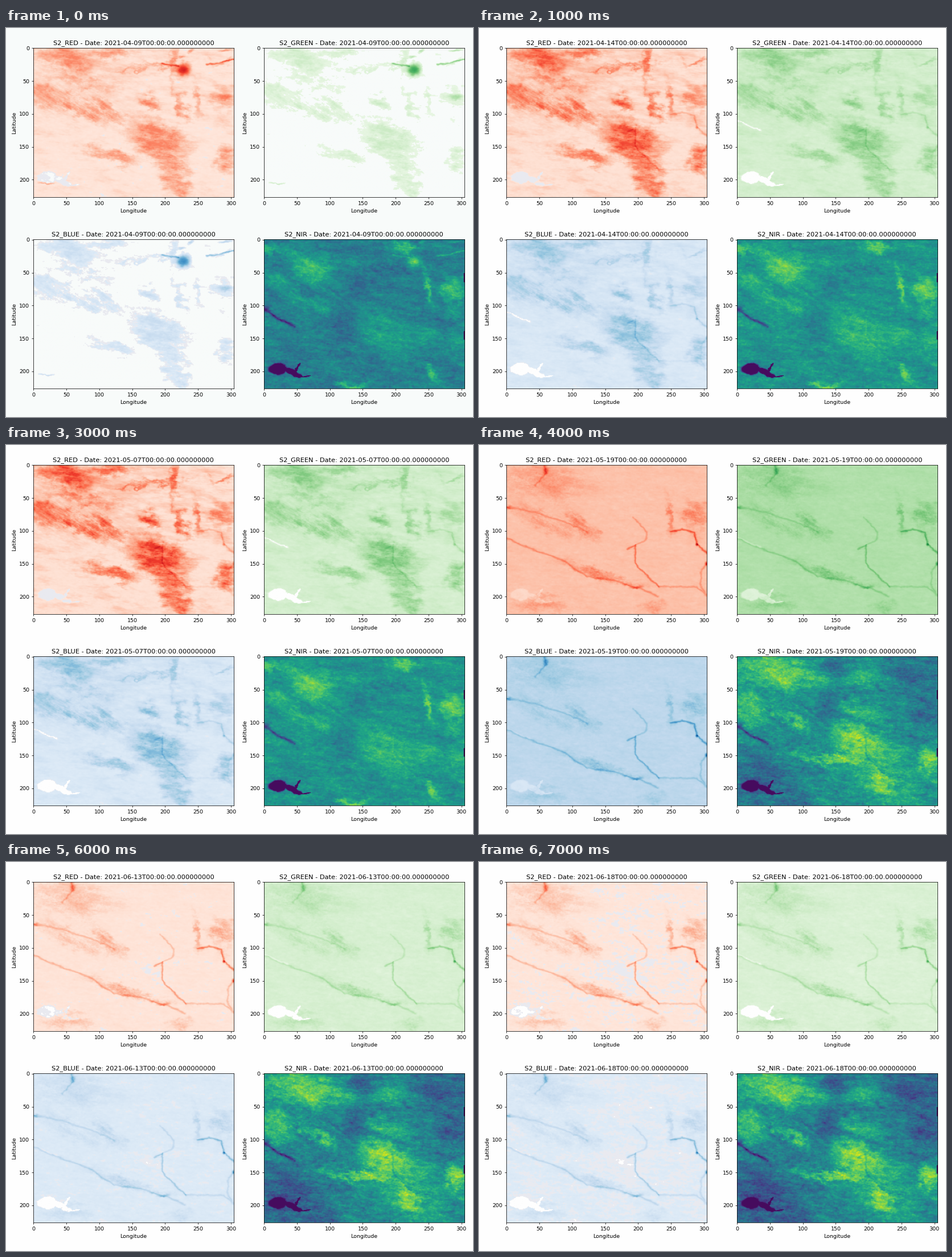
Write a matplotlib script that moves like this. It is 820 px wide and 683 px high and loops after 8000 ms.

```python
import numpy as np
import matplotlib.pyplot as plt
from matplotlib.animation import FuncAnimation

plt.rcParams["font.family"] = "DejaVu Sans"
W, H, DPI = 820, 683, 205 / 3
ROWS, COLS = 227, 305
Y, X = np.mgrid[:ROWS, :COLS].astype(float)
FY, FX = np.fft.fftfreq(ROWS)[:, None], np.fft.fftfreq(COLS)[None]


# ---- textures ----
def noise(seed, sx, sy, tilt=0.0):
    """Gaussian-filtered random field, drawn out along the tilt."""
    u = FX * np.cos(tilt) + FY * np.sin(tilt)
    v = FY * np.cos(tilt) - FX * np.sin(tilt)
    g = np.exp(-2 * np.pi ** 2 * ((sx * u) ** 2 + (sy * v) ** 2))
    raw = np.random.default_rng(seed).normal(size=(ROWS, COLS))
    n = np.fft.ifft2(np.fft.fft2(raw) * g).real
    return n / n.std()


def fractal(seed, sx, sy, tilt=0.0, octaves=4):
    n = sum(0.7 ** k * noise(seed + k, sx / 2 ** k, sy / 2 ** k, tilt) for k in range(octaves))
    return n / n.std()


WARP_X, WARP_Y = fractal(1, 7, 5), fractal(11, 7, 5)
FINE = noise(21, 0.8, 0.6)
PATCHY = noise(22, 2.2, 1.0, 0.1)


# ---- shapes ----
def spot(x, y, rx, ry, tilt=0, rag=3.5):
    """Soft ellipse with a ragged rim, tilt in degrees."""
    a = np.radians(tilt)
    dx, dy = X + rag * WARP_X - x, Y + rag * WARP_Y - y
    u, v = dx * np.cos(a) + dy * np.sin(a), dy * np.cos(a) - dx * np.sin(a)
    return np.exp(-((u / rx) ** 2 + (v / ry) ** 2) ** 1.5)


def spots(*specs, **kw):
    return np.max([spot(*s, **kw) for s in specs], axis=0)


def trail(*pts, w=1.4, wig=0.7):
    px, py = X + wig * WARP_X, Y + wig * WARP_Y
    best = np.full(X.shape, 1e9)
    for (ax, ay), (bx, by) in zip(pts, pts[1:]):
        dx, dy = bx - ax, by - ay
        t = np.clip(((px - ax) * dx + (py - ay) * dy) / (dx * dx + dy * dy), 0, 1)
        best = np.minimum(best, (px - ax - t * dx) ** 2 + (py - ay - t * dy) ** 2)
    return np.exp(-best / w ** 2)


def curve(f, start, end, w=1.5):
    xs = np.linspace(start, end, 14)
    return trail(*zip(xs, f(xs)), w=w)


# ---- water and lines ----
pond = spots((20, 196, 16, 9.5), (42, 202, 13, 4.5, 28), (51, 207, 8, 3), rag=0.7)
pond = np.maximum(pond, trail((46, 203), (50, 196), (54, 190), w=1.6))
pond = np.maximum(pond, trail((54, 208), (68, 207), w=1.3))
pond = np.clip(4 * pond - 1.2, 0, 1)
inlet = trail((0, 111), (35, 124), w=1.2)
wedge = np.maximum(spot(1, 106, 11, 5, 30, 1), trail((0, 107), (20, 119), (46, 131), w=2.2))

road = trail((185, 128), (195, 122), (195, 149), (210, 167), (229, 185))
river = trail((248, 101), (266, 98), (284, 103), (289, 121), (304, 134))
side = np.maximum(trail((229, 185), (288, 185), (304, 198)),
                  trail((303, 150), (295, 160), (293, 180), (301, 195)))
knots = spots((303, 150, 2.2, 3), (288.5, 121, 2, 2), rag=0)
brook = curve(lambda x: 112 + 0.38 * x + 11 * np.exp(-((x - 122) / 26) ** 2), 0, 229)
creek = curve(lambda x: 65 + 0.1 * x + 0.0017 * x * x, 0, 123)
gully = np.maximum(trail((57, 0), (60, 12), (43, 31)),
                   trail((192, 80), (213, 102), (210, 113), (195, 122)))
main_lines = river + 0.8 * road + 0.45 * side + 1.3 * knots
side_lines = 0.55 * (brook + 0.8 * creek + 0.8 * gully) + 0.7 * spots(
    (199, 186, 9, 3), (59, 8, 5, 6), (3, 66, 6, 2.5), rag=1)

# ---- land cover ----
slope = spot(70, 85, 85, 34, 20)
TEX = (1 - slope) * fractal(31, 12, 3.4, 0.12) + slope * fractal(41, 14, 2.6, 0.55)

core = spot(188, 140, 46, 25, 25)
bare = np.maximum(core, 0.75 * spots(
    (120, 164, 45, 10, 10), (205, 175, 30, 14, 40), (216, 207, 24, 15, 45),
    (45, 14, 48, 17, 8), (115, 8, 32, 9), (18, 76, 30, 15, 25), (72, 90, 48, 12, 28),
    (112, 94, 30, 9, 45), (175, 82, 15, 11), (222, 86, 7, 26, -20), (212, 25, 7, 26),
    (288, 168, 14, 20)))
bare = np.maximum(bare, 0.5 * spots(
    (75, 50, 60, 9, 10), (180, 30, 55, 4, -4), (290, 21, 22, 4, -10),
    (246, 78, 7, 26), (285, 78, 17, 20, -20)))
bare = np.clip(0.85 * bare + 0.13 * spot(100, 40, 160, 60)
               + 0.15 * TEX * (0.35 + bare) + 0.04 * FINE * bare, 0, 1)

crops = np.maximum(
    0.7 * spots((112, 90, 32, 11, 42), (246, 78, 7, 26), (285, 78, 17, 20, -20),
                (145, 166, 58, 8, 16)),
    0.4 * spots((52, 22, 68, 30, 8), (60, 86, 50, 13, 25), (220, 214, 18, 10),
                (55, 212, 45, 10)))
crops = np.clip(crops * (1 + 0.25 * TEX + 0.12 * FINE), 0, 1)

spring = np.maximum(
    spots((72, 46, 36, 20, 5), (7, 17, 11, 10), (215, 13, 20, 10), (247, 72, 7, 26, -5),
          (285, 80, 17, 20, -25), (255, 203, 18, 8, 45), (133, 221, 22, 6)),
    0.5 * spots((38, 24, 24, 9, 15), (65, 92, 48, 11, 25), (20, 66, 24, 10, 20),
                (250, 148, 26, 20, 40), (185, 145, 52, 30, 30), (288, 152, 18, 20)))
spring -= 0.35 * spots((147, 78, 15, 16), (118, 128, 23, 24), (160, 44, 45, 4))

summer = np.maximum(
    0.85 * spots((183, 130, 46, 26, 25), (150, 155, 64, 8, 2), (216, 192, 30, 14, 55),
                 (287, 155, 18, 22)),
    0.65 * spots((55, 22, 85, 30, 8), (20, 82, 28, 24, 30), (80, 92, 42, 9, 35)))
summer = np.maximum(summer, 0.45 * spots((188, 82, 42, 17, 10), (188, 35, 36, 18),
                                         (215, 170, 90, 55, 20)))
summer -= 0.28 * spots((272, 25, 40, 32), (140, 82, 17, 20), (145, 18, 18, 28),
                       (30, 188, 75, 45, 30), (285, 85, 25, 30))

hot = spot(227.5, 34, 10, 9.5, rag=1) + 0.6 * np.maximum(
    trail((196, 25), (207, 27), (220, 28)), trail((262, 26), (280, 22), (304, 18)))
hot += 0.4 * spots((238, 5, 4, 3), (225, 14, 6, 2), (292, 4, 12, 2), (291, 76, 10, 4),
                   (20, 205, 12, 1.5), rag=1)
edge = (X > 302.5) & (np.minimum(abs(Y - 58.5), abs(Y - 146)) < 7)

# ---- dates: one hazy, three bare, one bright, three green ----
DAYS = ["04-09", "04-14", "04-24", "05-07", "05-19", "05-24", "06-13", "06-18"]
BRIGHT = 4
WHITE = np.array([254, 254, 254]) / 255
TINT = np.array([248, 251, 250]) / 255
PALE = np.array([233, 234, 240]) / 255

# scale, base, haze loss, soil gain, crop gain, line gain, pond loss, pale and white limits
BANDS = {
    "RED": ("Reds", .130, .025, .47, .20, .30, .065, .082, .03),
    "GREEN": ("Greens", .195, .145, .25, .16, .22, .160, .10, .10),
    "BLUE": ("Blues", .148, .105, .27, .14, .28, .110, .12, .095),
    "NIR": ("viridis",),
}


def visible(i, band):
    base, loss, soil, crop, line, wet = BANDS[band][1:7]
    v = base - wet * pond + 0.006 * (TEX + PATCHY) + 0.004 * FINE
    if band != "RED" and i:
        v -= 0.8 * wet * inlet
    if i == 0:
        v += 0.65 * soil * bare + 0.55 * hot - loss
    elif i < BRIGHT:
        v += soil * (0.87 + 0.06 * i) * bare + line * 0.45 * main_lines
    else:
        late = i - BRIGHT
        v += crop * crops + line * (main_lines + side_lines)
        v += 0.13 if late == 0 else 0.01 - 0.011 * late - 0.02 * core
        if band == "RED" and late == 0:
            v -= 0.03
        elif band == "RED":
            v -= 0.015
    return v


def infrared(i):
    grain = 0.03 * TEX + 0.02 * PATCHY + 0.022 * FINE
    if i < BRIGHT:
        v = 0.52 + 0.23 * spring + grain + 0.05 * road * (i > 0)
        if i == 0:
            v += 0.28 * hot * (Y < 60) - 0.085
    else:
        late = i - BRIGHT
        v = 0.47 - 0.02 * late + (0.38 + 0.03 * late) * summer + 1.3 * grain
        v -= 0.12 * (road + 0.5 * river + knots)
    v = (v - 0.33 * wedge) * (1 - pond) + 0.03 * pond
    return np.where(edge, 0, v)


def paint(i, band):
    v = infrared(i) if band == "NIR" else visible(i, band)
    rgb = plt.get_cmap(BANDS[band][0])(np.clip(v, 0, 1))[..., :3]
    if band != "NIR":
        pale, white = BANDS[band][7:]
        rgb[v < pale] = PALE
        rgb[v < white] = WHITE if i else TINT
    return rgb


# ---- figure ----
fig, axes = plt.subplots(2, 2, figsize=((W + .01) / DPI, (H + .01) / DPI), dpi=DPI)
panels = []
for ax, band in zip(axes.flat, BANDS):
    img = ax.imshow(np.ones((ROWS, COLS, 3)))
    ax.set_xlabel("Longitude")
    ax.set_ylabel("Latitude")
    panels.append((band, img, ax.set_title("")))


def update(i):
    fig.set_facecolor(WHITE if i else TINT)
    for band, img, title in panels:
        img.set_data(paint(i, band))
        title.set_text(f"S2_{band} - Date: 2021-{DAYS[i]}T00:00:00.000000000")
    return []


update(0)
fig.tight_layout()
anim = FuncAnimation(fig, update, frames=len(DAYS), interval=1000, repeat=True,
                     repeat_delay=0, blit=False)
plt.show()
```
